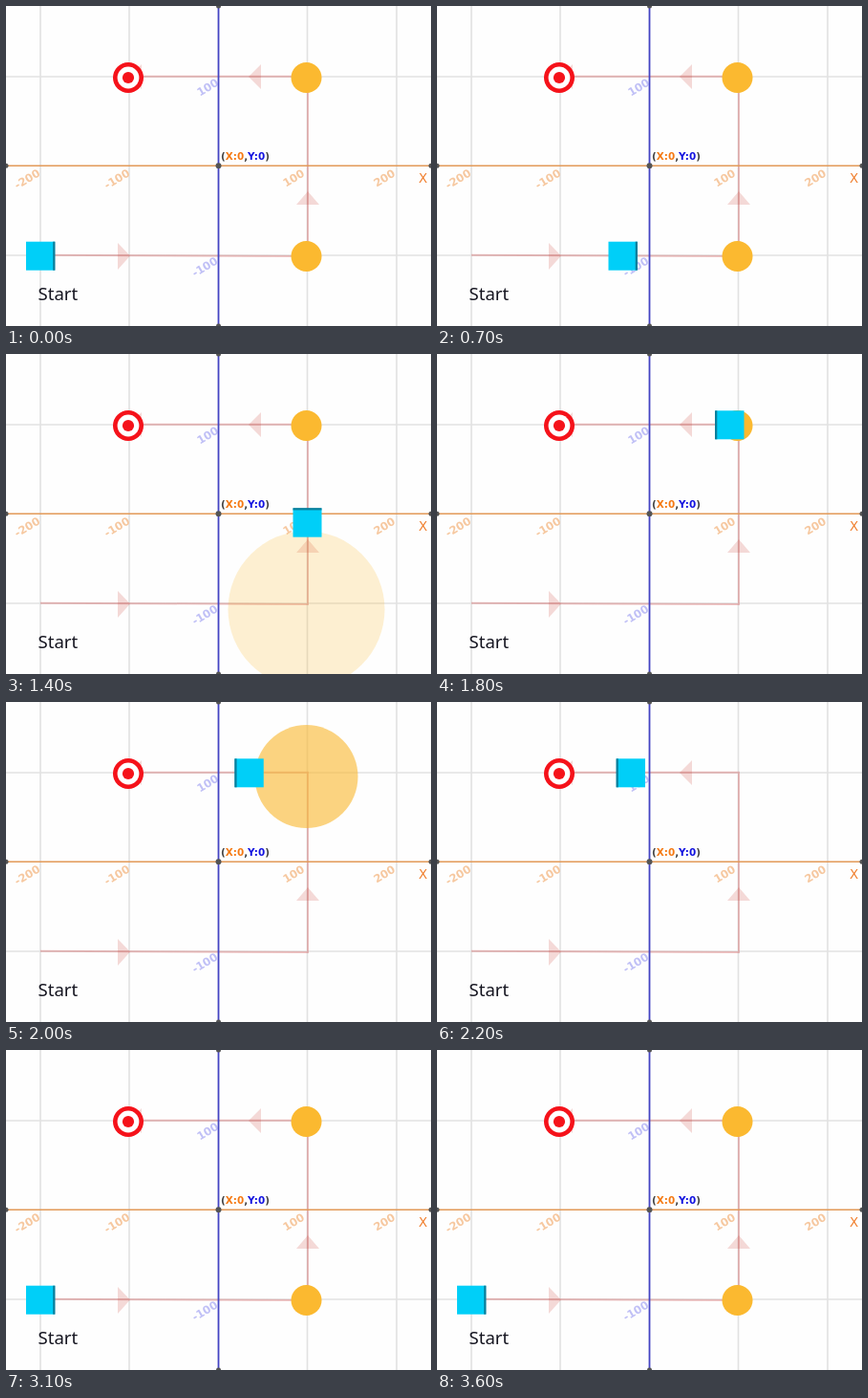
Animation, 445 px wide and 335 px high, one loop 3.9 s. Source, as an HTML page:

```html
<!DOCTYPE html>
<html lang="en">
<head>
<meta charset="utf-8">
<title>Coordinate path</title>
<style>
  html, body { margin: 0; width: 100%; height: 100%; overflow: hidden; background: #fefefe; }
  svg { display: block; width: 445px; height: 335px; }
  text { font-family: "DejaVu Sans", sans-serif; }
  .grid { stroke: #e2e2e2; stroke-width: 1.6; }
  .trail { fill: none; stroke: #c83232; stroke-opacity: .3; stroke-width: 2; }
  .arrows { fill: #c83c32; fill-opacity: .19; }
  .tick { font-size: 11.5px; font-weight: bold; text-anchor: middle; }
  .ox { fill: #f6c8a0; }
  .oy { fill: #c0c0f6; }
  .origin { font-size: 10.4px; font-weight: bold; fill: #444; }
  .start { font: 18.6px "Noto Sans", "Open Sans", sans-serif; fill: #151520; }
</style>
</head>
<body>
<svg viewBox="0 0 445 335">
  <path class="grid" d="M36 0V335M129 0V335M315.5 0V335M409 0V335M0 74H445M0 261H445"/>
  <g id="ticks"></g>
  <path class="trail" d="M36 260.7L316 262V73.7H129"/>
  <path class="arrows" d="M130 261.5L117 248V276ZM316 194L304 208H328ZM254 74L267 61V87ZM129 74L142 61V87Z"/>
  <path d="M0 167.3H445" stroke="#e39a58" stroke-width="1.6"/>
  <path d="M222.5 0V335" stroke="#4444c4" stroke-width="1.8"/>
  <g fill="#555">
    <circle cx="222.5" cy="167.3" r="3"/>
    <circle cx="0" cy="167.3" r="2.5"/>
    <circle cx="445" cy="167.3" r="2.5"/>
    <circle cx="222.5" cy="0" r="2.5"/>
    <circle cx="222.5" cy="335" r="2.5"/>
  </g>
  <text class="origin" x="225" y="160.5">(<tspan fill="#f57a14">X:0</tspan>,<tspan fill="#1414e0">Y:0</tspan>)</text>
  <text x="432" y="184.5" font-size="13.5" fill="#f08030">X</text>
  <text class="start" x="33.5" y="308">Start</text>
  <g id="coinA"><circle r="16" fill="#fbb930"/></g>
  <g id="coinB"><circle r="16" fill="#fbb930"/></g>
  <g id="goal">
    <circle r="16" fill="#f5121a"/>
    <circle r="11.4" fill="#fff"/>
    <circle r="6.1" fill="#f5121a"/>
  </g>
  <g id="box">
    <rect x="-15" y="-15" width="30" height="30" fill="#00cff8"/>
    <rect x="13.2" y="-15" width="2.3" height="30" fill="#0a7f9c"/>
  </g>
</svg>
<script>
const LOOP = 3900, STEP = 100, RESET = 3100;
const $ = id => document.getElementById(id);

const ticks = [
  [22, 181, "-200", "ox"], [116, 181, "-100", "ox"], [301, 180, "100", "ox"],
  [396, 180, "200", "ox"], [211, 85, "100", "oy"], [208, 273, "-100", "oy"]
];
$("ticks").innerHTML = ticks.map(([x, y, label, axis]) =>
  `<text class="tick ${axis}" transform="translate(${x} ${y}) rotate(-31)" y="4.2">${label}</text>`).join("");

// time in ms -> distance travelled along the path
const pace = [[130, 0], [700, 158.5], [1200, 308.5], [1800, 476], [2200, 579.5], [2490, 654]];
// each leg: start x, start y, direction in degrees, length
const legs = [[36, 261.7, 0, 279.3], [315.5, 261.7, -90, 187.7], [315.5, 74.3, 180, 187.5]];

// bursts: start time, time of return, place, drift per unit of growth
const bursts = [
  { el: $("coinA"), from: 1136, back: 3000, x: 314.5, y: 262, dx: 0, dy: 1.3 },
  { el: $("coinB"), from: 1848, back: 3000, x: 314.5, y: 75, dx: 0, dy: 1.3 },
  { el: $("goal"), from: 2476, back: RESET, x: 128, y: 75, dx: -.8, dy: 1.1 }
];

function distance(t) {
  if (t <= pace[0][0] || t >= RESET) return 0;
  for (let i = 1; i < pace.length; i++) {
    const [t0, d0] = pace[i - 1], [t1, d1] = pace[i];
    if (t <= t1) return d0 + (d1 - d0) * (t - t0) / (t1 - t0);
  }
  return pace[pace.length - 1][1];
}

function placeBox(t) {
  let d = distance(t), i = 0;
  while (i < legs.length - 1 && d > legs[i][3]) d -= legs[i++][3];
  const [x, y, angle] = legs[i];
  $("box").setAttribute("transform", `translate(${x} ${y}) rotate(${angle}) translate(${d} 0)`);
}

function placeBurst(b, t) {
  const age = t >= b.back ? 0 : Math.max(0, t - b.from);
  const grow = age / 64;
  const alpha = age < 300 ? Math.min(1, 1 - (age - 40) * .0035) : 0;
  b.el.setAttribute("transform",
    `translate(${b.x + b.dx * grow} ${b.y + b.dy * grow}) scale(${1 + grow})`);
  b.el.setAttribute("opacity", alpha);
}

function draw(now) {
  const t = Math.floor((now % LOOP) / STEP) * STEP;
  placeBox(t);
  bursts.forEach(b => placeBurst(b, t));
}

const begin = performance.now();
function tick() {
  draw(performance.now() - begin);
  requestAnimationFrame(tick);
}
tick();
</script>
</body>
</html>
```
